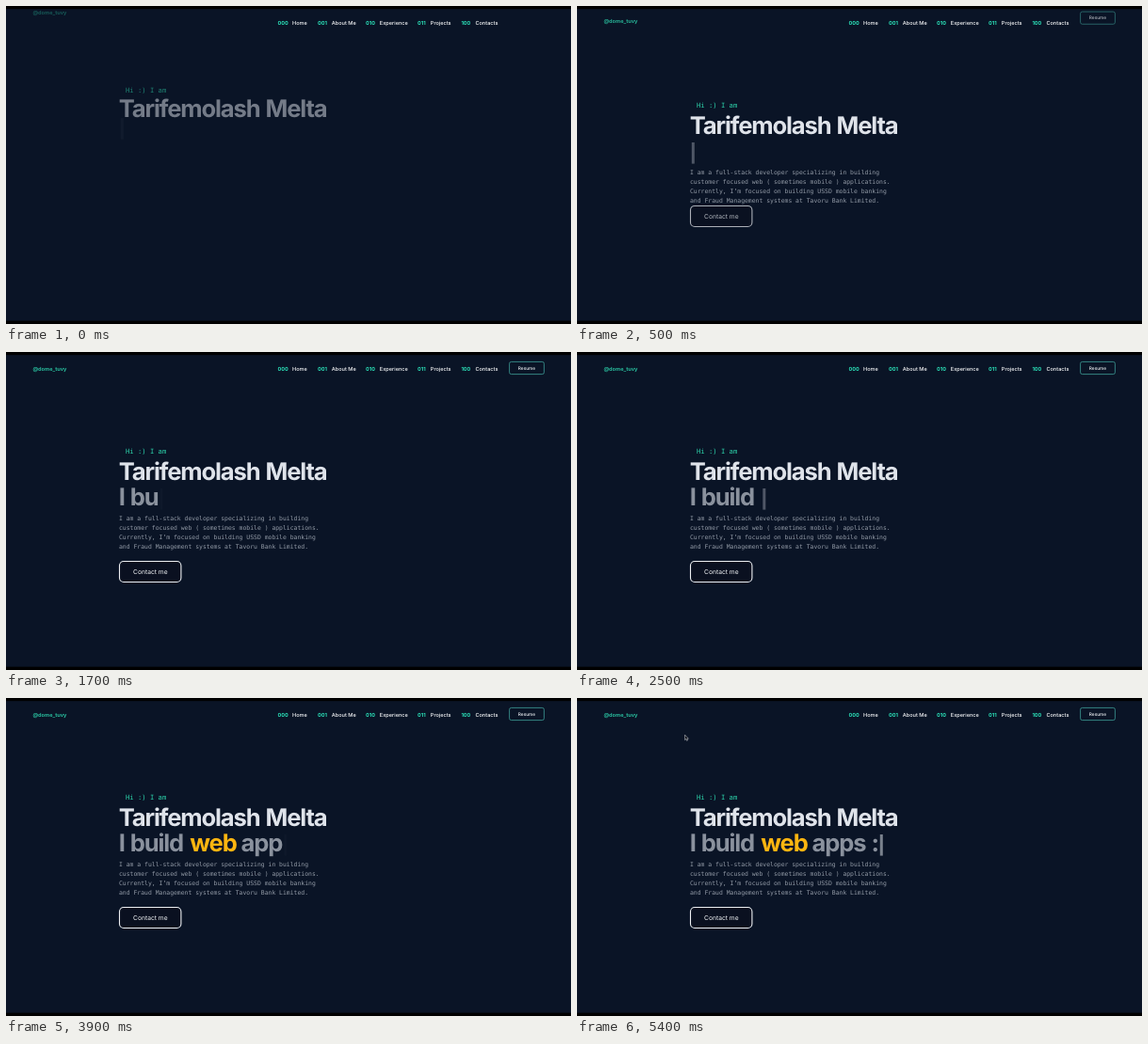
These frames come from a looping animation (600 by 338 pixels, 5.5 s). An HTML page:

```html
<!DOCTYPE html>
<html lang="en">
<head>
<meta charset="utf-8">
<title>Portfolio intro</title>
<style>
  html, body { margin: 0; width: 100%; height: 100%; overflow: hidden; background: #0a1426; }
  svg { display: block; width: 100vw; height: 100vh; }
  text {
    font-family: Inter, sans-serif;
    font-optical-sizing: none;
    text-rendering: geometricPrecision;
    white-space: pre;
  }
  .mono { font-family: "DejaVu Sans Mono", monospace; }
  .big { font-size: 25.6px; font-weight: 700; letter-spacing: -0.045em; word-spacing: 0.04em; }
  .nav { font-size: 5.6px; font-weight: 500; fill: #fafbfc; }
  .num { font-size: 5.6px; font-weight: 700; fill: #2be2b9; }
</style>
</head>
<body>
<svg viewBox="0 0 600 338" xmlns="http://www.w3.org/2000/svg">
  <rect width="600" height="338" fill="#0a1426"/>

  <g id="nav"></g>
  <g id="handle"><text x="28.4" y="19.5" font-size="5.6" font-weight="700" fill="#28ba9b">@dome_tuvy</text></g>
  <g id="resume">
    <rect x="534.6" y="10.4" width="36.8" height="13.2" rx="2" fill="none" stroke="#3f9f98" stroke-width=".8"/>
    <text x="553" y="18.5" font-size="4.8" font-weight="500" fill="#f0f3f6" text-anchor="middle">Resume</text>
  </g>

  <g id="hi"><text class="mono" x="127" y="107.6" font-size="7.2" fill="#2dd4ac">Hi :) I am</text></g>
  <g id="name"><text class="big" x="119.8" y="136" fill="#dfe3ea">Tarifemolash Melta</text></g>
  <g id="build">
    <g id="words"></g>
    <rect id="caret" y="145" width="3" height="22.6" fill="#8d949f"/>
  </g>
  <g id="about" class="mono" font-size="6.43" fill="#939ba7"></g>
  <g id="contact">
    <rect x="120.5" y="222.5" width="65.4" height="22" rx="4.5" fill="#0a1020" stroke="#eef0f3" stroke-width="1.1"/>
    <text x="153.3" y="236.1" font-size="6.7" fill="#f4f6f8" text-anchor="middle">Contact me</text>
  </g>

  <path id="mouse" d="M114.6 39.2v5.4l1.2-1.1.8 1.9.9-.4-.8-1.8h1.6z" fill="#05080f" stroke="#e8ebef" stroke-width=".5"/>
  <rect width="600" height="3.2"/>
  <rect y="334.6" width="600" height="3.4"/>
</svg>
<script>
const LOOP = 5500, STEP = 100;
const $ = id => document.getElementById(id);

function addText(parent, x, y, content, cls) {
  const el = document.createElementNS("http://www.w3.org/2000/svg", "text");
  el.setAttribute("x", x);
  el.setAttribute("y", y);
  el.setAttribute("class", cls);
  el.textContent = content;
  return parent.appendChild(el);
}

[
  ["000", 288.4, "Home", 304],
  ["001", 331, "About Me", 345.8],
  ["010", 382, "Experience", 396.8],
  ["011", 437, "Projects", 450.8],
  ["100", 483.4, "Contacts", 498.4]
].forEach(([num, nx, label, lx]) => {
  addText($("nav"), nx, 19.7, num, "num");
  addText($("nav"), lx, 19.7, label, "nav");
});

[
  "I am a full-stack developer specializing in building",
  "customer focused web ( sometimes mobile ) applications.",
  "Currently, I’m focused on building USSD mobile banking",
  "and Fraud Management systems at Tavoru Bank Limited."
].forEach((line, i) => addText($("about"), 120, 179.2 + i * 10, line, "mono"));

// Typed words; each begins once the previous one is complete
let total = 0;
const words = [
  { text: "I build ", x: 119.8, fill: "#8a919d" },
  { text: "web ", x: 195.3, fill: "#fdb510" },
  { text: "apps :", x: 249.6, fill: "#8a919d" }
].map(w => {
  const el = addText($("words"), w.x, 163.4, "", "big");
  el.setAttribute("fill", w.fill);
  const first = total;
  total += w.text.length;
  return { ...w, el, first };
});

// Entrances: start, duration (ms) and drop distance
const entrances = [
  ["handle", -221, 984, 16.7],
  ["resume", 45, 984, 15],
  ["hi", -176, 500, 36],
  ["name", -146, 500, 36],
  ["build", -76, 500, 36],
  ["about", 25, 500, 36],
  ["contact", 270, 500, 34.5]
];

function enter([id, start, span, drop], t) {
  const u = Math.min(1, Math.max(0, (t - start) / span));
  const rest = (1 - u) ** 2;
  $(id).setAttribute("opacity", 1 - rest);
  $(id).setAttribute("transform", `translate(0 ${-drop * rest})`);
}

function type(t) {
  const count = Math.min(total, Math.max(0, Math.floor((t - 850) / 200)));
  let end = 0;
  for (const w of words) {
    w.el.textContent = w.text.slice(0, Math.max(0, count - w.first));
    if (count >= w.first) {
      end = w.x + (count > w.first ? w.el.getComputedTextLength() : 0);
    }
  }
  const blink = (0.5 + 0.5 * Math.cos(2 * Math.PI * (t / 1000 - 0.3))) ** 1.5;
  $("caret").setAttribute("x", end + 2);
  $("caret").setAttribute("opacity", blink);
}

function draw(t) {
  entrances.forEach(e => enter(e, t));
  type(t);
  $("mouse").setAttribute("opacity", t >= 5200 ? 1 : 0);
}

const begin = performance.now();
function tick() {
  const t = (performance.now() - begin) % LOOP;
  draw(Math.floor(t / STEP) * STEP);
  requestAnimationFrame(tick);
}
tick();
</script>
</body>
</html>
```
